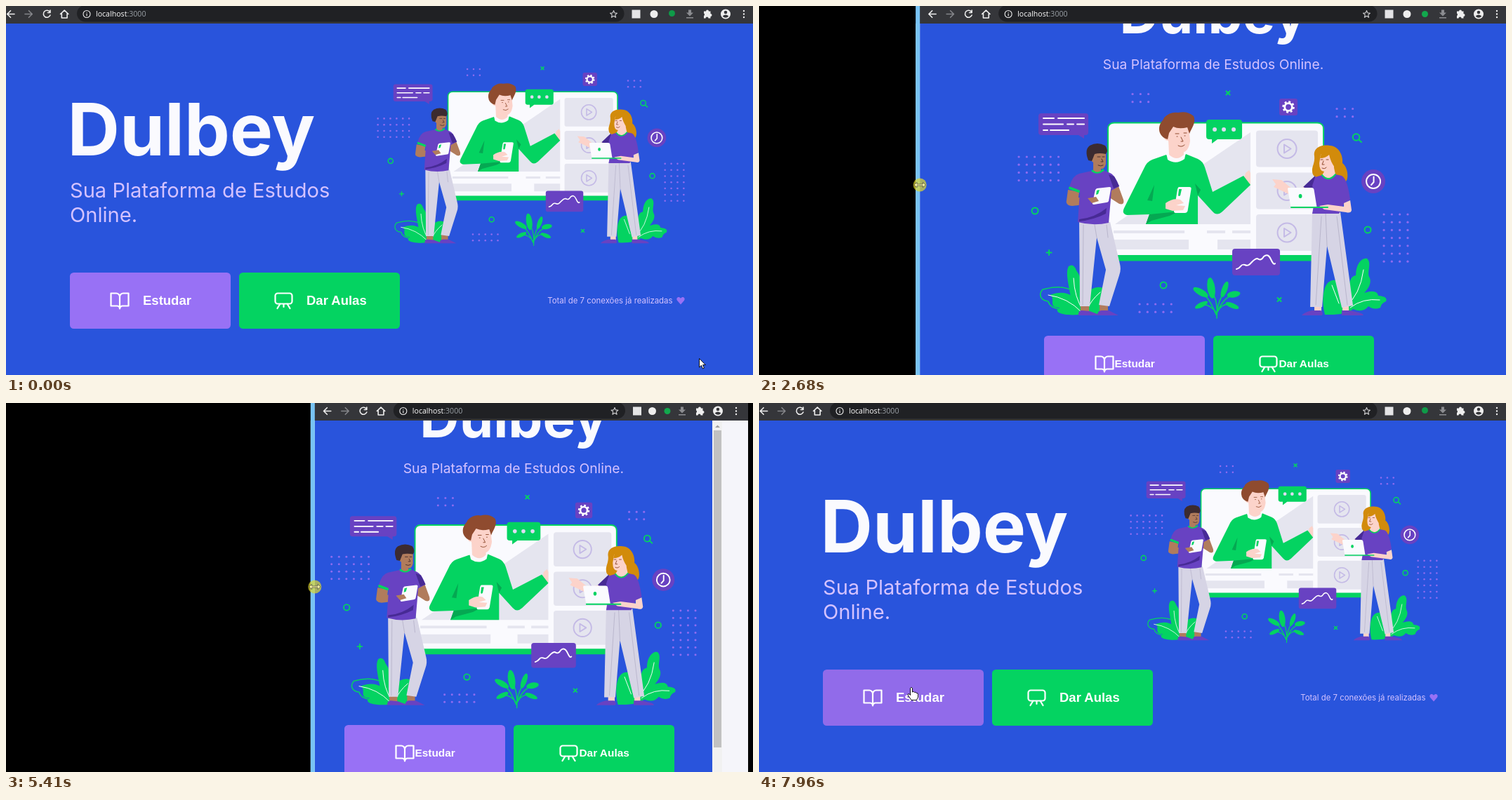
An HTML page for the animation above (8 s loop, 1064x526 px).

```html
<!DOCTYPE html>
<html lang="pt-BR">
<head>
<meta charset="utf-8">
<title>Plataforma de Estudos</title>
<style>
html, body { margin: 0; height: 100%; overflow: hidden; background: #000; }
svg { display: block; }
#stage { width: 100vw; height: 100vh; }
text { font-family: Inter, sans-serif; fill: #d4c2ff; }
#logo { font-weight: 700; fill: #fafafe; }
.label { font-family: "Liberation Sans", Arial, sans-serif; font-weight: 700; fill: #fff; }
.url { font: 10.6px "Open Sans", sans-serif; fill: #fff; }
.line { fill: none; stroke-linecap: round; stroke-linejoin: round; }
.w { stroke: #fff; } .g { stroke: #04d361; }
.green { fill: #04d361; } .purple { fill: #6842c2; } .dark { fill: #472a95; }
.white { fill: #fafafe; } .grey { fill: #e5e5ef; } .pants { fill: #d6d4e5; }
.pink { fill: #fcd3ca; } .brown { fill: #b17c5c; }
</style>
</head>
<body>
<svg id="stage" viewBox="0 0 1064 526" preserveAspectRatio="none">
  <rect width="1064" height="526" fill="#f5f5fa"/>
  <rect id="page" height="526" fill="#2954dc"/>

  <svg id="hero" viewBox="368 118 558 329">
    <g id="dots" class="line" stroke="#8f6cf0" stroke-width="3.2"/>

    <!-- plants -->
    <g class="green">
      <path d="M444 440C450 420 433 384 441 371Q448 366 452 377Q462 390 457 402Q467 404 464 412Q478 396 492 403V440Z"/>
      <path d="M456 440C432 442 418 436 428 430C410 430 424 416 414 412Q446 400 460 432Z"/>
      <path d="M806 440C800 415 804 388 822 391Q834 395 836 405C843 400 839 386 850 384C850 366 860 358 866 360C873 366 866 378 869 386C874 394 867 404 862 409Q880 403 882 413Q896 414 893 421Q886 424 885 430Q876 434 868 428Q860 438 846 432Q836 441 806 440Z"/>
      <ellipse cx="644" cy="402" rx="5.500" ry="15" transform="rotate(-8 644 402)"/>
      <ellipse cx="663" cy="404" rx="4" ry="12" transform="rotate(20 663 404)"/>
      <ellipse cx="629" cy="408" rx="4.500" ry="12" transform="rotate(-60 629 408)"/>
      <ellipse cx="630" cy="426" rx="3.500" ry="10" transform="rotate(64 630 426)"/>
      <ellipse cx="676" cy="411" rx="4.500" ry="9.500" transform="rotate(80 676 411)"/>
      <ellipse cx="674" cy="427" rx="3.500" ry="10" transform="rotate(-68 674 427)"/>
    </g>
    <g class="line g" stroke-width="1.6">
      <path d="M652 445Q654 420 645 408M652 436Q655 418 664 405M651 440Q640 412 628 408M652 438Q642 424 630 426M653 436Q662 413 680 411M653 436Q660 422 674 426"/>
      <path d="M452 408C430 396 414 402 404 404C397 412 402 420 412 421Q414 430 428 432"/>
    </g>
    <path class="line w" stroke-width="1" d="M448 388Q449 415 462 435M412 412Q440 416 459 436M486 408Q472 420 468 432M861 376Q856 412 836 428M884 419Q860 416 842 430M816 398L826 424"/>

    <!-- screen -->
    <rect class="green" x="496" y="165.500" width="309" height="198" rx="9"/>
    <path class="white" d="M498 355V175Q498 167.500 506 167.500H795Q803 167.500 803 175V355Z"/>
    <path class="grey" d="M700 180V311H507Z"/>
    <g id="thumbs"/>
    <path class="grey" d="M505 320h101v4H505zM638 320h26v4h-26zM674 320h26v4h-26zM505 333h107v14H505zM653 333h47v14h-47z"/>

    <!-- presenter -->
    <path class="pink" d="M689 252L693 238L698 234L700 238V254L692 262Z"/>
    <path class="green" d="M580 212Q594 228 608 211L625 218Q632 221 635 230L646 265L690 242L700 255L660 293Q652 300 646 293L625 270V311H551L556 297L524 298Q516 296 520 288L548 232Q552 222 560 219Z"/>
    <path fill="#05a852" d="M551 311L556 297L597 293L585 299L559 306ZM625 270L621 253L629 262ZM553 277L563 255L560 278Z"/>
    <path class="white" d="M580 210L582 219Q594 227 606 218L608 209L602 206L584 208Z"/>
    <path class="pink" d="M583 190H605V212Q595 222 584 212Z"/>
    <path class="pink" d="M577 174Q596 166 612 174L614 192Q612 209 601 209Q588 208 583 192Q575 192 577 181Z"/>
    <path fill="#8f4b2f" d="M571 181C567 168 576 164 577 159Q586 150 597 152Q610 149 619 157C623 166 616 174 613 182L610 173Q598 176 590 172L584 181L582 190Q574 188 571 181Z"/>
    <path class="line" stroke="#8f4b2f" d="M593 182h5M605 181h4M595 186h1M606 185h1M601 187l3 6h-3M597 199q5 3 9-1"/>
    <path class="white" d="M598 258h15q3 0 2.500 3l-5 31q-1 3-4 3h-13q-3 0-2.500-3l5-31q1-3 2-3z"/>
    <path class="green" d="M598 261h4l-2 9q-2 2-3 0z"/>
    <path class="pink" d="M579 281Q590 273 600 276L605 281L594 284L607 285L604 291L589 292L579 289Z"/>

    <!-- callouts -->
    <path class="green" d="M641 162h43q4 0 4 4v20q0 4-4 4H653L645 196V190H641q-4 0-4-4v-20q0-4 4-4z"/>
    <g fill="#dfdcf3"><circle cx="649" cy="176" r="3"/><circle cx="662" cy="176" r="3"/><circle cx="676" cy="176" r="3"/></g>
    <path class="purple" d="M402 153h63q4 0 4 4v23q0 4-4 4h-2v5l-8-5h-53q-4 0-4-4v-23q0-4 4-4z"/>
    <path class="line w" stroke-width="2" d="M405 160h15M426 160h37M405 168.500h28M439 168.500h9M453 168.500h10M405 177h6M415 177h26"/>
    <rect class="purple" x="741" y="132" width="26" height="24" rx="3"/>
    <circle class="line w" cx="754" cy="144" r="5.300" stroke-width="2.800"/>
    <circle cx="754" cy="144" r="7.500" fill="none" class="w" stroke-width="2.500" stroke-dasharray="2.900 2.990"/>
    <circle class="purple" cx="875" cy="250" r="17"/>
    <g class="line w" stroke-width="2"><circle cx="875" cy="250" r="10"/><path d="M875.500 243.500V251L872 255"/></g>
    <rect class="purple" x="674" y="346" width="68" height="38" rx="4"/>
    <path class="line w" stroke-width="2" d="M680 375C688 373 685 367 692 369C700 373 702 360 710 360Q715 364 719 357Q725 352 729 361T735 367"/>
    <g class="line g" stroke-width="2">
      <circle cx="850.500" cy="187" r="4.800"/><path d="M854 190.500L858 194"/>
      <circle cx="393" cy="292" r="4.500"/><circle cx="867" cy="319" r="4.500"/><circle cx="576" cy="398" r="4.500"/>
      <path d="M665.500 121.500l5 5m0-5l-5 5M738.500 416l5 5m0-5l-5 5M413 348v7m-3.500-3.500h7"/>
    </g>

    <!-- student -->
    <path class="brown" d="M458 424h12v12h-12zM485 424h12v12h-12z"/>
    <path class="purple" d="M455 441Q454 434 460 434L471 435L487 441ZM482 441Q482 434 488 434L498 434L512 441Z"/>
    <path class="pants" d="M456 308H500L514 368Q516 376 513 384L499 428L484 426L494 376L481 330L471 428H457Z"/>
    <path class="line" stroke="#b9b6cc" d="M462 312L461 426M481 330L478 312M495 312L497 330"/>
    <path class="brown" d="M440 262L456 265L455 273L478 274L482 281L446 285Q436 284 438 277ZM502 260L512 257L519 276Q521 284 513 282L499 273Z"/>
    <path class="purple" d="M474 235Q482 241 490 234L500 238Q507 241 513 257L502 263L498 309Q476 314 454 308L457 264L442 258Q446 242 456 239Z"/>
    <path class="dark" d="M456 304Q478 302 495 288L494 296Q476 305 456 307ZM498 240L506 243L513 257L505 260Z"/>
    <path class="line g" stroke-width="4" d="M443 259.500L455 264"/>
    <path class="line g" stroke-width="3" d="M475 235Q482 240 490 234"/>
    <path class="brown" d="M471 206Q486 201 494 210L494 225Q492 233 487 232V235Q481 239 476 234V223L470 218Z"/>
    <path fill="#3c2b30" d="M469 220Q463 205 471 199Q482 193 493 199Q498 206 494 211Q485 209 478 211L474 221Z"/>
    <path class="line" stroke="#4a3030" d="M482 215h4M489 215h3M488 218l2 4h-3M483 227q4 2 7 0"/>
    <path class="white" d="M481 260L499 258Q502 258 501 261L498 278Q497 280 495 280L477 283Q474 283 475 280L479 262Z"/>
    <path class="green" d="M481 263l4-1-2 6-3 1z"/>
    <path class="brown" d="M468 274L480 272L484 278L474 281Z"/>

    <!-- teacher -->
    <path class="pink" d="M791 425h10v12h-10zM831 424h9v12h-9z"/>
    <path class="purple" d="M773 441Q776 437 787 434L800 434Q804 437 802 441ZM830 441V434H842L854 437Q860 438 861 441Z"/>
    <path fill="#d28b0b" d="M791 214C789 202 801 197 813 199C828 200 832 216 831 224C839 230 840 246 836 250Q826 256 808 245Q788 247 788 236C787 229 792 224 791 214Z"/>
    <path class="pants" d="M788 294H828L846 427L830 430L809 342L802 429H785Z"/>
    <path class="line" stroke="#b9b6cc" d="M807 296L809 342M801 300L793 426M823 300L838 426"/>
    <path class="dark" d="M792 242L775 258L783 266L796 258Z"/>
    <path class="pink" d="M776 258L761 262L744 248L731 247L736 254L733 258L748 265L760 271L782 268Z"/>
    <path class="purple" d="M802 241Q812 252 821 240L830 242Q838 246 842 276L833 282L826 296H788Q793 272 788 256L792 244Z"/>
    <path class="pink" d="M833 281L842 277L844 291Q843 296 836 294L805 290L798 285L810 283L833 286Z"/>
    <path class="pink" d="M800 212Q806 204 818 210L819 231L821 240Q811 250 802 241L805 236Q798 236 798 224Z"/>
    <path class="line g" stroke-width="2" d="M802 241Q811 252 821 240"/>
    <path fill="#d28b0b" d="M799 217Q807 217 812 212Q814 222 820 230L829 218L819 204L802 205Z"/>
    <path class="line" stroke="#8f4b2f" d="M800 219h3M808 219h3M804 221l-2 5h3M802 231q4 2 6-1"/>
    <path class="white" d="M754 259h33q3 0 3.500 3l4 25h-35q-2 0-2.500-3l-4-23q0-2 1-2z"/>
    <path class="line g" stroke-width="2" d="M758 287H810"/>
    <ellipse class="green" cx="771" cy="271" rx="2.400" ry="3"/>
  </svg>

  <text id="logo">Dulbey</text>
  <text id="sub1"></text>
  <text id="sub2">Online.</text>
  <g id="study"><rect height="80" rx="5.500"/>
    <path class="line w" stroke-width="2.200" d="M-12.500-10.500h7.500a5 5 0 0 1 5 5v17a4 4 0 0 0-4-4h-8.500zM12.500-10.500h-7.500a5 5 0 0 0-5 5v17a4 4 0 0 1 4-4h8.500z"/>
    <text class="label">Estudar</text></g>
  <g id="teach"><rect height="80" rx="5.500" fill="#04d361"/>
    <path class="line w" stroke-width="2.200" d="M-8.500-10.500h17a3.500 3.500 0 0 1 3.500 3.500v8a3.500 3.500 0 0 1-3.500 3.500h-17a3.500 3.500 0 0 1-3.500-3.500v-8a3.500 3.500 0 0 1 3.500-3.500zM-5 4.500l-4 6.500M0 4.500v4.500M5 4.500l4 6.500"/>
    <text class="label">Dar Aulas</text></g>
  <g id="total"><text x="-17.500" y="4" font-size="11.400" text-anchor="end">Total de 7 conexões já realizadas</text>
    <path fill="#9871f5" d="M-6 5.500L-11-.2C-13.500-4-8.500-7-6-3.200C-3.500-7 1.500-4-1-.2Z"/></g>

  <g id="scroll"><rect y="26" width="14" height="500" fill="#f1f1f1"/><rect x="2" y="39" width="11" height="452" fill="#c1c1c1"/><path d="M4 35h7l-3.500-3.500z" fill="#a0a0a0"/></g>

  <!-- browser bar -->
  <rect width="1064" height="25" fill="#35363a"/>
  <rect id="pill" y="-1" height="23.500" rx="11.700" fill="#202124"/>
  <g id="nav" class="line" stroke="#eee" stroke-width="1.600">
    <path d="M23 11.500H13m4.500-4.800L12.700 11.500l4.800 4.800"/>
    <path stroke="#85868a" d="M38 11.500h10m-4.500-4.800l4.800 4.800-4.800 4.800"/>
    <path d="M73.500 8.500A5 5 0 1 0 74 13M74 6v3.500h-3.500"/>
    <path d="M88.500 11.500l5.700-5.300 5.700 5.300M90.300 10.500v6.500h7.800v-6.500"/>
    <g stroke-width="1.100"><circle cx="126" cy="11.500" r="5"/><path d="M126 11v3M126 9v.1"/></g>
    <text class="url" x="139" y="15.200" stroke="none">localhost<tspan fill="#9aa0a6">:3000</tspan></text>
  </g>
  <path id="star" class="line" stroke="#d0d0d2" stroke-width="1.100" d="M0-5l1.400 3.400 3.600.3-2.800 2.400.9 3.600L0 2.800l-3.100 1.900.9-3.600L-5-1.300l3.600-.3z"/>
  <g id="icons">
    <rect x="-6" y="-6" width="12" height="12" fill="#e4e4e6"/>
    <circle r="5.500" fill="#eee"/>
    <circle r="4.500"/>
    <path fill="#8b8c90" d="M-2-6h4v4h3L0 3-5-2h3zM-5 4.500H5v1.500H-5z"/>
    <path fill="#eee" d="M-5-4h3a2 2 0 0 1 4 0h2.500v3.500a2 2 0 0 1 0 4V6H1.500a2 2 0 0 0-4 0H-5V2.500a2 2 0 0 0 0-3.500z"/>
    <path fill="#eee" fill-rule="evenodd" d="M0-7a7 7 0 1 1 0 14a7 7 0 1 1 0-14zM0-4.800a2.300 2.300 0 1 0 0 4.600a2.300 2.300 0 1 0 0-4.600zM-4.400 3Q0 7.500 4.400 3Q0-.8-4.400 3z"/>
    <path class="line" stroke="#eee" stroke-width="2.400" d="M0-4.500v.01M0 0v.01M0 4.500v.01"/>
  </g>

  <rect id="right" x="1057" width="7" height="526"/>
  <rect id="left" height="526"/>
  <rect id="edge" width="6" height="526" fill="#78c3f4"/>

  <g id="resize"><circle id="halo" r="9.500" fill="#e0d82c" opacity=".7"/>
    <path d="M-8 0l3.800-3.800v2.800h8.400v-2.800L8 0l-3.800 3.800V1h-8.400v2.800z" fill="#fdf6a0" stroke="#444" stroke-width=".7"/></g>
  <path id="arrow" fill="#fff" stroke="#000" stroke-width=".9" d="M.5.500V13L3.400 10.300 5.400 15 7.400 14.100 5.500 9.600H9.300Z"/>
  <path id="hand" fill="#fff" stroke="#000" stroke-width=".9" d="M-1.500 1.500Q0-1 1.500 1.500V7Q3.500 5.500 4.500 7.500Q6.500 6.500 7.200 8.500Q9.500 8 9.500 10.500V14L7.500 18.500H0L-4.500 12Q-5.500 9-3.500 9.500L-1.500 11.500Z"/>
</svg>

<script>
const $ = id => document.getElementById(id);
const set = (el, attrs) => { for (const k in attrs) el.setAttribute(k, attrs[k]); };
const move = (el, x, y) => el.setAttribute('transform', `translate(${x} ${y})`);
const show = (el, on) => { el.style.display = on ? '' : 'none'; };

// dot grids: x, y, columns, rows
$('dots').innerHTML = [[370, 215, 6, 4], [532, 125.5, 3, 2], [823, 146.500, 3, 2], [890, 297, 4, 7], [542, 425, 5, 2]]
  .map(([x, y, cols, rows]) => Array.from({length: cols * rows}, (_, i) =>
    `<path d="M${x + i % cols * 11.3} ${y + Math.floor(i / cols) * 11.2}h.01"/>`).join('')).join('');
$('thumbs').innerHTML = [203.5, 263.5, 323].map(y =>
  `<rect class="grey" x="708" y="${y - 26}" width="88" height="52" rx="4"/>
   <g class="line" stroke="#c4bae6" stroke-width="2"><circle cx="752" cy="${y}" r="13.500"/><path d="M748 ${y - 6}l9.500 6-9.500 6z"/></g>`).join('');

const LOOP = 8000, HOME = -11, MAX_LEFT = 669, RIGHT = 1069, BREAKPOINT = 868;
// bursts of stepped motion: start, end, intervals
const BURSTS = [[70, 830, 10], [1990, 4070, 27], [4940, 6330, 18], [7490, 7960, 6]];
const DRAG = [[1913, HOME], [2200, 60], [2683, 229], [2760, 263], [3600, 661], [3850, 735], [4070, 750],
  [4863, 750], [5100, 640], [5403, 440], [5710, 286], [6020, 176], [6330, HOME]];
const SHIELD_UP = [[0, 300], [1530, 1780], [5790, 6480], [6710, 7600], [7900, 8000]];
const ICONS = [897.5, 923, 948.5, 974, 999, 1025, 1051];
const ICONS_LATE = [899, 920.5, 942, 963, 988, 1014, 1040];

function snap(t) {
  const burst = BURSTS.filter(b => t >= b[0]).pop();
  if (!burst) return 0;
  const [start, end, n] = burst, step = (end - start) / n;
  return Math.min(end, start + Math.floor((t - start) / step + .15) * step);
}

function track(keys, t) {
  const i = keys.findIndex(k => k[0] > t);
  if (i < 0) return keys[keys.length - 1][1];
  if (!i) return keys[0][1];
  const [t0, a] = keys[i - 1], [t1, b] = keys[i];
  return a + (b - a) * (t - t0) / (t1 - t0);
}

function button(id, x, y, width, wide, iconDx, textDx) {
  const [rect, icon, text] = $(id).children;
  set(rect, {x, y, width});
  move(icon, x + width / 2 + iconDx, y + 40);
  set(text, {x: x + width / 2 + textDx, y: y + (wide ? 46 : 45), 'font-size': wide ? 18.5 : 15.4});
}

function layoutPage(left, view) {
  const full = view - left, wide = full > BREAKPOINT;
  const bar = !wide && full > 454 ? 14 : 0;
  const width = full - bar, cx = left + width / 2;
  const content = wide ? Math.min(876, width * .9) : width * .9, x = cx - content / 2;
  const heroW = wide ? content * .501 : Math.min(558, full * .9), heroH = heroW * .59;
  const top = 280 - (271 + heroH) / 2;
  const heroY = wide ? 84 : top + 138;
  const btnY = Math.round(wide ? 380 : heroY + heroH + 22.5);
  const btnW = Math.round(wide ? 229 : Math.min(229, content / 2 - 12));
  const btnX = Math.round(wide ? x : cx - btnW - 12);
  const anchor = wide ? 'start' : 'middle', tx = wide ? x : cx;

  set($('page'), {x: left, width});
  set($('hero'), {x: wide ? x + content - heroW : cx - heroW / 2, y: heroY, width: heroW, height: heroH});
  set($('logo'), {x: wide ? x - 3.5 : cx, y: wide ? 213 : top + 59, 'font-size': wide ? 103 : 78, 'text-anchor': anchor});
  set($('sub1'), {x: tx, y: wide ? 272.5 : top + 110, 'font-size': wide ? 29.1 : 19.3, 'text-anchor': anchor});
  $('sub1').textContent = 'Sua Plataforma de Estudos' + (wide ? '' : ' Online.');
  set($('sub2'), {x: tx, y: 307.5, 'font-size': 29.1});
  show($('sub2'), wide);
  button('study', btnX, btnY, btnW, wide, wide ? -43.5 : -28.5, wide ? -10.5 : -14);
  button('teach', btnX + btnW + 12, btnY, btnW, wide, wide ? -51 : -36, wide ? -18.5 : -21);
  move($('total'), wide ? x + content : cx + 97.5, wide ? 420 : btnY + 103);
  move($('scroll'), left + width, 0);
  show($('scroll'), bar);
}

function layoutBar(left, late, t) {
  const narrow = left > 630, star = narrow ? 942 : late ? 867 : 865.5;
  set($('pill'), {x: left + 112, width: star + 15 - left - 112});
  move($('nav'), left, 0);
  move($('star'), star, 11.5);
  const up = SHIELD_UP.some(([a, b]) => t >= a && t < b);
  [...$('icons').children].forEach((icon, i) => {
    move(icon, (late ? ICONS_LATE : ICONS)[i], i === 2 && up ? 10.5 : 11.5);
    show(icon, i > 2 || !narrow);
    if (i === 2) icon.setAttribute('fill', up ? '#0f9a48' : '#12a84d');
  });
}

function draw(t) {
  const s = snap(t), grab = track(DRAG, s), left = Math.min(MAX_LEFT, grab);
  const late = s >= 5170 && s < 5640;
  const lag = late ? -49 : s >= 5640 && s < 6330 ? -7 : s >= 1990 && s < 3610 ? 10 : 0;
  layoutPage(left, RIGHT + lag);
  layoutBar(left, late, t);
  show($('right'), late);
  set($('left'), {width: Math.max(0, left - 6)});
  set($('edge'), {x: left - 6});

  const dragging = s >= 1990 && s < 6330, touching = t >= 910 && t < 980;
  show($('resize'), dragging || touching);
  show($('halo'), dragging);
  move($('resize'), dragging ? grab : -3, dragging ? track([[1990, 248], [2680, 255], [4070, 262]], s) : 247.5);

  const entering = s >= 7490;
  const p = Math.min(1, Math.max(0, (s + 6) / 836)), ease = s < 70 ? 0 : p * p * (3 - 2 * p);
  const x = entering ? track([[7490, 61], [7960, 217]], s) : 987 - 1002 * ease;
  const y = entering ? track([[7490, 436], [7960, 405]], s) : 502 - 254 * ease;
  const hover = entering && x > 91;
  show($('arrow'), s < 830 || entering && !hover);
  show($('hand'), hover);
  move($('arrow'), x, y);
  move($('hand'), x, y);
  set($('study').children[0], {fill: hover ? '#916bea' : '#9871f5'});
}

function frame() {
  draw(performance.now() % LOOP);
  requestAnimationFrame(frame);
}
frame();
</script>
</body>
</html>
```
